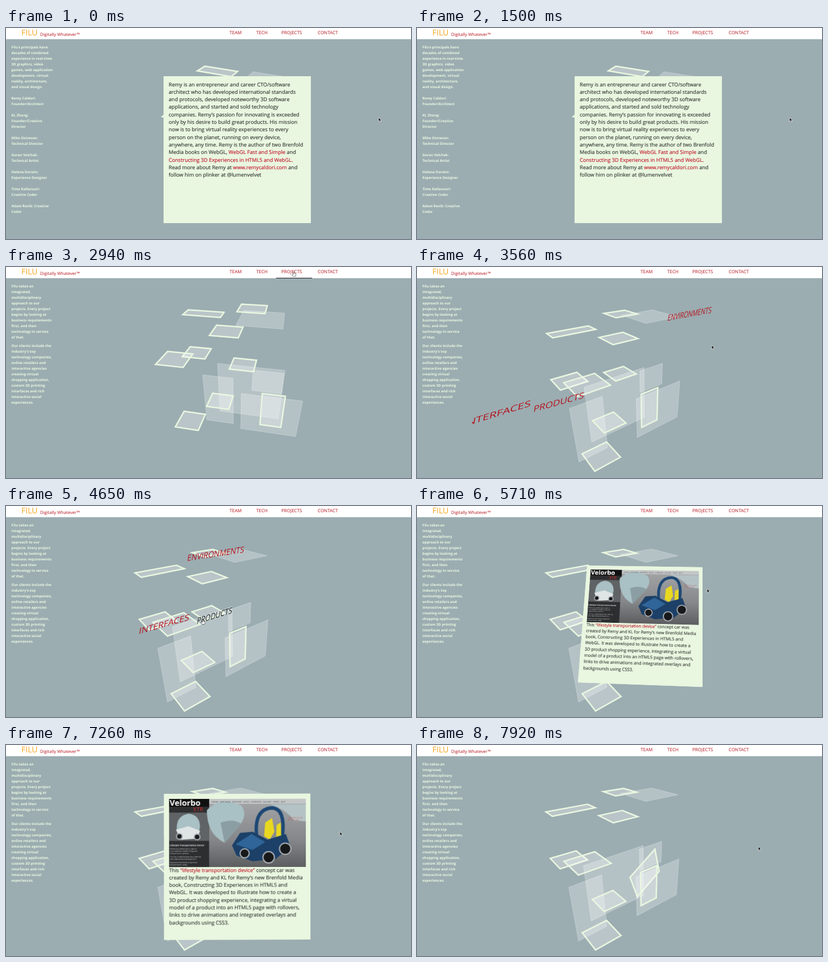
These frames come from a looping animation (712 by 372 pixels, 8 s). An HTML page with a canvas:

```html
<!DOCTYPE html>
<html lang="en">
<head>
<meta charset="utf-8">
<title>Panels</title>
<style>
  html, body { margin: 0; width: 100%; height: 100%; overflow: hidden; }
  body { position: relative; background: #9badb1; font-family: "Open Sans", "Noto Sans", sans-serif; text-rendering: geometricPrecision; }
  canvas, header, header *, aside, .card, .card > *, #cursor { position: absolute; top: 0; }
  canvas { left: 0; }
  header { left: 0; width: 712px; height: 19px; background: #fff; border-bottom: 1px solid #dfe5e6; color: #b5121b; font-size: 8px; line-height: 18px; white-space: nowrap; }
  #brand { left: 27px; color: #f5a51c; font-size: 14px; }
  #slogan { left: 60px; top: 2.5px; font-size: 7.6px; }
  #underline { left: 475px; top: 18.5px; width: 63px; height: 1.5px; background: #222; }
  aside { left: 9.5px; top: 28.5px; color: #ebf8e1; font: 700 6.2px/10px "Open Sans", "Noto Sans", sans-serif; white-space: pre; }
  aside p { margin: 0 0 5px; }
  .card { left: 0; width: 259px; height: 259px; transform-origin: 0 0; background: #e9f6e0; color: #323733; }
  .card p { left: 9px; top: 7.6px; margin: 0; font-size: 9.15px; line-height: 13.3px; white-space: pre; -webkit-text-stroke: .15px; }
  .card b { font-weight: inherit; color: #c01527; }
  .card svg { left: 9px; top: 8.5px; width: 242px; height: 121px; }
  #cursor { left: 0; width: 12px; height: 14px; overflow: visible; }
</style>
</head>
<body>
<canvas id="scene" width="712" height="372"></canvas>

<header>
  <span id="brand">FILU</span><span id="slogan">Digitally Whatever™</span>
  <span style="left:393px">TEAM</span><span style="left:440px">TECH</span>
  <span style="left:484px">PROJECTS</span><span style="left:548px">CONTACT</span>
  <i id="underline"></i>
</header>

<aside id="team">Filu’s principals have
decades of combined
experience in real-time
3D graphics, video
games, web application
development, virtual
reality, architecture,
and visual design.

Remy Caldori:
Founder/Architect

KL Zhong:
Founder/Creative
Director

Mike Ostrevan:
Technical Director

Goran Velchak:
Technical Artist

Helena Dorwin:
Experience Designer

Timo Kallavuori:
Creative Coder

Adam Revik: Creative
Coder</aside>

<aside id="projects"><p>Filu takes an
integrated,
multidisciplinary
approach to our
projects. Every project
begins by looking at
business requirements
first, and then
technology in service
of that.</p><p>Our clients include the
industry’s top
technology companies,
online retailers and
interactive agencies
creating virtual
shopping application,
custom 3D printing
interfaces and rich
interactive social
experiences.</p></aside>

<div class="card" id="bio"><p>Remy is an entrepreneur and career CTO/software
architect who has developed international standards
and protocols, developed noteworthy 3D software
applications, and started and sold technology
companies. Remy’s passion for innovating is exceeded
only by his desire to build great products. His mission
now is to bring virtual reality experiences to every
person on the planet, running on every device,
anywhere, any time. Remy is the author of two Brenfold
Media books on WebGL, <b>WebGL Fast and Simple</b> and
<b>Constructing 3D Experiences in HTML5 and WebGL.</b>
Read more about Remy at <b>www.remycaldori.com</b> and
follow him on plinker at @lumenvelvet</p></div>

<div class="card" id="product">
  <svg viewBox="0 0 239 120" preserveAspectRatio="none">
    <defs><linearGradient id="studio" x2="0" y2="1">
      <stop offset="0" stop-color="#a4a6a8"/><stop offset=".6" stop-color="#85878a"/><stop offset="1" stop-color="#5c5e60"/>
    </linearGradient></defs>
    <path fill="url(#studio)" d="M0 0H239V120H0Z"/>
    <path fill="#c3c6c7" d="M70 0H239V9H70Z"/>
    <path fill="#2c2e30" d="M0 0H70V120H0Z"/>
    <path fill="#606365" d="M0 24H70V74H0Z"/>
    <path fill="#111" d="M0 0H70V14H0Z"/>
    <path fill="#a9c0c4" d="M66 20Q90 -6 126 12Q138 26 124 46L97 77Q66 62 66 20ZM14 58Q10 30 34 26Q54 28 54 50L50 66H20Z"/>
    <path fill="#8a9ea3" d="M97 77L90 42Q112 34 126 44Z"/>
    <path fill="#b4c2c5" d="M176 10Q204 18 218 38L239 40V10Z"/>
    <path fill="#dfe4e4" d="M12 54L34 48L54 56L50 70L20 72Z"/>
    <path fill="none" stroke="#1d4875" stroke-width="6" d="M153 66Q148 18 180 16Q204 18 198 66"/>
    <path fill="#e9d820" d="M168 42L180 34L184 58L176 72L166 66ZM188 46L195 42L196 66L187 68Z"/>
    <path fill="#1c4068" d="M110 82L124 60L146 58L172 72L204 62L212 84L186 106L146 110L118 100Z"/>
    <path fill="#2f6598" d="M116 80L144 62L168 76L146 90Z"/>
    <g fill="#17181a" stroke="#aeb4b8" stroke-width="2">
      <circle cx="132" cy="96" r="8"/><circle cx="174" cy="103" r="10"/><circle cx="203" cy="88" r="10"/>
      <circle cx="18" cy="66" r="5"/><circle cx="49" cy="67" r="5"/>
    </g>
    <g font-family="Open Sans, sans-serif">
      <text x="1" y="12" font-size="14" font-weight="700" fill="#fff">Velorbo</text>
      <text x="42" y="22" font-size="10" fill="#d22a2a">XTR</text>
      <text x="74" y="6.5" font-size="3.6" fill="#444" xml:space="preserve">ORDER   TEST DRIVE   FEATURES   SPECS   CHARGING   GALLERY   VIDEO   QUIT</text>
      <g fill="#eee" font-size="3.1">
        <text x="1" y="83" font-size="3.9" font-weight="700">Lifestyle Transportation Device</text>
        <text x="1" y="89">All that you need to go in style, in</text>
        <text x="1" y="93">a car made for modern living and</text>
        <text x="1" y="97">transportation systems.</text>
        <text x="1" y="103">The new model features easy steering</text>
        <text x="1" y="107">and a light printed driving frame.</text>
        <text x="1" y="113">Experience the future in personal</text>
        <text x="1" y="117">transportation, today.</text>
      </g>
      <g fill="#c44" font-size="3"><text x="208" y="34">Light glass canopy</text><text x="208" y="38">for open views.</text></g>
    </g>
  </svg>
  <p style="top:128.5px">This <b>“lifestyle transportation device”</b> concept car was
created by Remy and KL for Remy’s new Brenfold Media
book, Constructing 3D Experiences in HTML5 and
WebGL. It was developed to illustrate how to create a
3D product shopping experience, integrating a virtual
model of a product into an HTML5 page with rollovers,
links to drive animations and integrated overlays and
backgrounds using CSS3.</p>
</div>

<svg id="cursor" stroke="#fff" stroke-width=".6">
  <path id="arrow" fill="#111" d="M0 0V6.6L1.6 5.2L2.8 7.8L4 7.2L2.9 4.8H5Z"/>
  <path id="hand" fill="#fff" stroke="#333" d="M-.8 .6Q0 -.4 .8 .6V3L3.6 4Q4.2 5 3.2 8.6H-1.4L-3.4 5.2Q-3 4.2 -.8 5.4Z"/>
</svg>

<script>
const DURATION = 8000, STEP = 160, CARD = 259;
const FOCAL = 425, CENTER_X = 404.5, CENTER_Y = 196;
const $ = id => document.getElementById(id);
const ctx = $('scene').getContext('2d');

const flat = (x, y, z, w = 53, h = 53) => ({ x, y, z, w, h });
const upright = (...args) => ({ ...flat(...args), standing: true });

// Panels around the orbit centre, in pixels at the distance of that centre.
const slabs = [
  flat(12, 94, -96), flat(-85, 77, -99, 79, 37), flat(-26, 67, -46), flat(-105, -10, -95), flat(-111, 26, -1),
  flat(-2, -24, -88), flat(-49, -111, -63), flat(-100, -127, -6), upright(68, -134, -77, 53, 99),
];
const walls = [
  flat(35, 97, -38, 72, 72), upright(-69, -159, -119, 75, 150), upright(9, -123, -122, 155, 148),
  upright(53, -38, -53, 60, 50), upright(64, -114, -39, 122, 101),
];
const BIO = slabs[0], PRODUCT = slabs[5];

// Text matrices [a, b, x, y] on arrival and at rest, then the sideways exit.
const labels = [
  ['ENVIRONMENTS', [.63, -.115, 440, 95], [.817, -.123, 318, 97], 240],
  ['INTERFACES', [1.32, -.41, 81, 282], [.985, -.277, 233, 226], -60],
  ['PRODUCTS', [1.07, -.3, 204, 256], [.747, -.229, 335, 208], 70],
];

const linear = u => u;
const inOut = u => u < .5 ? 4 * u ** 3 : 1 - 4 * (1 - u) ** 3;
const mix = (a, b, u) => a.map((v, i) => v + (b[i] - v) * u);

function track(t, keys, ease = linear) {
  const next = keys.findIndex(key => key[0] > t);
  if (next === 0) return keys[0][1];
  if (next < 0) return keys[keys.length - 1][1];
  const [t0, a] = keys[next - 1], [t1, b] = keys[next];
  return mix(a, b, ease((t - t0) / (t1 - t0)));
}
const ramp = (t, start, end) => Math.min(1, Math.max(0, (t - start) / (end - start)));

// Corners on screen; turn swings the camera from the team view (0) to the projects view (1).
function corners({ x, y, z, w, h, standing }, turn) {
  const yaw = (114 - 63 * turn) * Math.PI / 180, pitch = (36 - 8.5 * turn) * Math.PI / 180;
  return [[-1, -1], [1, -1], [1, 1], [-1, 1]].flatMap(([u, v]) => {
    const px = x + u * w / 2;
    const py = standing ? y - v * h / 2 : y;
    const pz = standing ? z : z + v * h / 2;
    const side = px * Math.sin(yaw) + pz * Math.cos(yaw);
    const ahead = px * Math.cos(yaw) - pz * Math.sin(yaw);
    const scale = FOCAL / (FOCAL + ahead * Math.cos(pitch) - py * Math.sin(pitch));
    const up = ahead * Math.sin(pitch) + py * Math.cos(pitch);
    return [CENTER_X + side * scale, CENTER_Y - up * scale];
  });
}

const FULL = [277, 85, 536, 85, 536, 344, 277, 344];
const bioClosing = [[1310, FULL], [2150, [466, 39, 495, 94, 439, 129, 413, 76]], [2310, corners(BIO, 0)]];
const productOpening = [[5000, corners(PRODUCT, 1)], [5710, [299, 105, 502, 108, 502, 319, 283, 311]], [6050, FULL]];
const productClosing = [[7040, FULL], [7920, [373, 233, 419, 181, 427, 223, 387, 270]]];
const pointer = [
  [1350, [655, 158]], [2150, [506, 8]], [3350, [506, 8]], [3560, [518, 138]], [4410, [346, 200]],
  [4800, [346, 200]], [5710, [510, 146]], [6640, [587, 153]], [7150, [587, 153]], [7920, [600, 179]],
];

// The picture changes in bursts of discrete steps and rests in between.
const bursts = [[1350, 2310], [2460, 3350], [3560, 4410], [4650, 5570], [5710, 6640], [7150, 7920]];
function stepped(t) {
  const burst = bursts.filter(([start]) => start <= t).pop();
  if (!burst) return 0;
  const [start, end] = burst;
  return t >= end ? end : start + Math.floor((t - start) / STEP) * STEP;
}

function outline(q) {
  ctx.beginPath();
  for (let i = 0; i < 8; i += 2) ctx.lineTo(q[i], q[i + 1]);
  ctx.closePath();
}

function drawWall(q) {
  outline(q);
  ctx.fillStyle = ctx.strokeStyle = 'rgba(255,255,255,.26)';
  ctx.lineWidth = 1;
  ctx.fill();
  ctx.stroke();
}

// The border lies inside the shape, so the doubled stroke is clipped.
function drawSlab(q) {
  ctx.save();
  outline(q);
  ctx.clip();
  ctx.fillStyle = 'rgba(255,255,255,.3)';
  ctx.strokeStyle = '#e9f6e0';
  ctx.lineWidth = 5;
  ctx.fill();
  ctx.stroke();
  ctx.restore();
}

function drawLabels(t) {
  if (t < 3560) return;
  const arrive = 1 - (1 - ramp(t, 3560, 4410)) ** 2;
  const leave = ramp(t, 4800, 5262);
  ctx.save();
  ctx.beginPath();
  ctx.rect(97, 20, 615, 352);
  ctx.clip();
  ctx.globalAlpha = 1 - leave;
  ctx.font = '16px "Open Sans", "Noto Sans", sans-serif';
  for (const [text, from, to, exit] of labels) {
    const [a, b, x, y] = mix(from, to, arrive);
    ctx.setTransform(a, b, -.15, .94, x + exit * leave, y);
    ctx.fillStyle = text === 'PRODUCTS' && t >= 4650 ? '#222' : '#b5121b';
    ctx.fillText(text, 0, 0);
  }
  ctx.restore();
}

// Projects the square card onto four corners.
function placeCard(card, [x0, y0, x1, y1, x2, y2, x3, y3], opacity) {
  const dx1 = x1 - x2, dx2 = x3 - x2, sx = x0 - x1 + x2 - x3;
  const dy1 = y1 - y2, dy2 = y3 - y2, sy = y0 - y1 + y2 - y3;
  const det = dx1 * dy2 - dx2 * dy1;
  const g = (sx * dy2 - dx2 * sy) / det, h = (dx1 * sy - sx * dy1) / det;
  const col = (x, y, w) => [x / CARD, y / CARD, 0, w / CARD];
  const matrix = [
    ...col(x1 - x0 + g * x1, y1 - y0 + g * y1, g),
    ...col(x3 - x0 + h * x3, y3 - y0 + h * y3, h),
    0, 0, 1, 0, x0, y0, 0, 1,
  ];
  card.style.transform = `matrix3d(${matrix.map(v => v.toFixed(8))})`;
  card.style.opacity = opacity;
  show(card, opacity > 0);
}

function show(element, visible) {
  element.style.display = visible ? '' : 'none';
}

function render(t) {
  const turn = inOut(ramp(t, 2460, 3760));
  const bio = track(t, bioClosing, inOut);
  const product = t < 7150 ? track(t, productOpening) : track(t, productClosing, inOut);

  ctx.clearRect(0, 0, 712, 372);
  walls.forEach(wall => drawWall(corners(wall, turn)));
  slabs.forEach(slab => {
    if (slab === BIO && t < 2310) drawSlab(bio);
    else if (slab === PRODUCT && t > 5000) drawSlab(product);
    else drawSlab(corners(slab, turn));
  });
  drawLabels(t);

  placeCard($('bio'), bio, 1 - ramp(t, 1680, 1990));
  placeCard($('product'), product, ramp(t, 5350, 5700) - ramp(t, 7450, 7750));

  show($('team'), t < 2460);
  show($('projects'), t >= 2460);
  show($('underline'), t >= 2150 && t < 3560);

  const hand = t >= 2150 && t < 3560 || t >= 4650 && t < 4960;
  show($('hand'), hand);
  show($('arrow'), !hand);
  const [x, y] = track(t, pointer);
  $('cursor').style.transform = `translate(${x}px, ${y}px)`;
}

function tick() {
  render(stepped(performance.now() % DURATION));
  requestAnimationFrame(tick);
}
tick();
</script>
</body>
</html>
```
